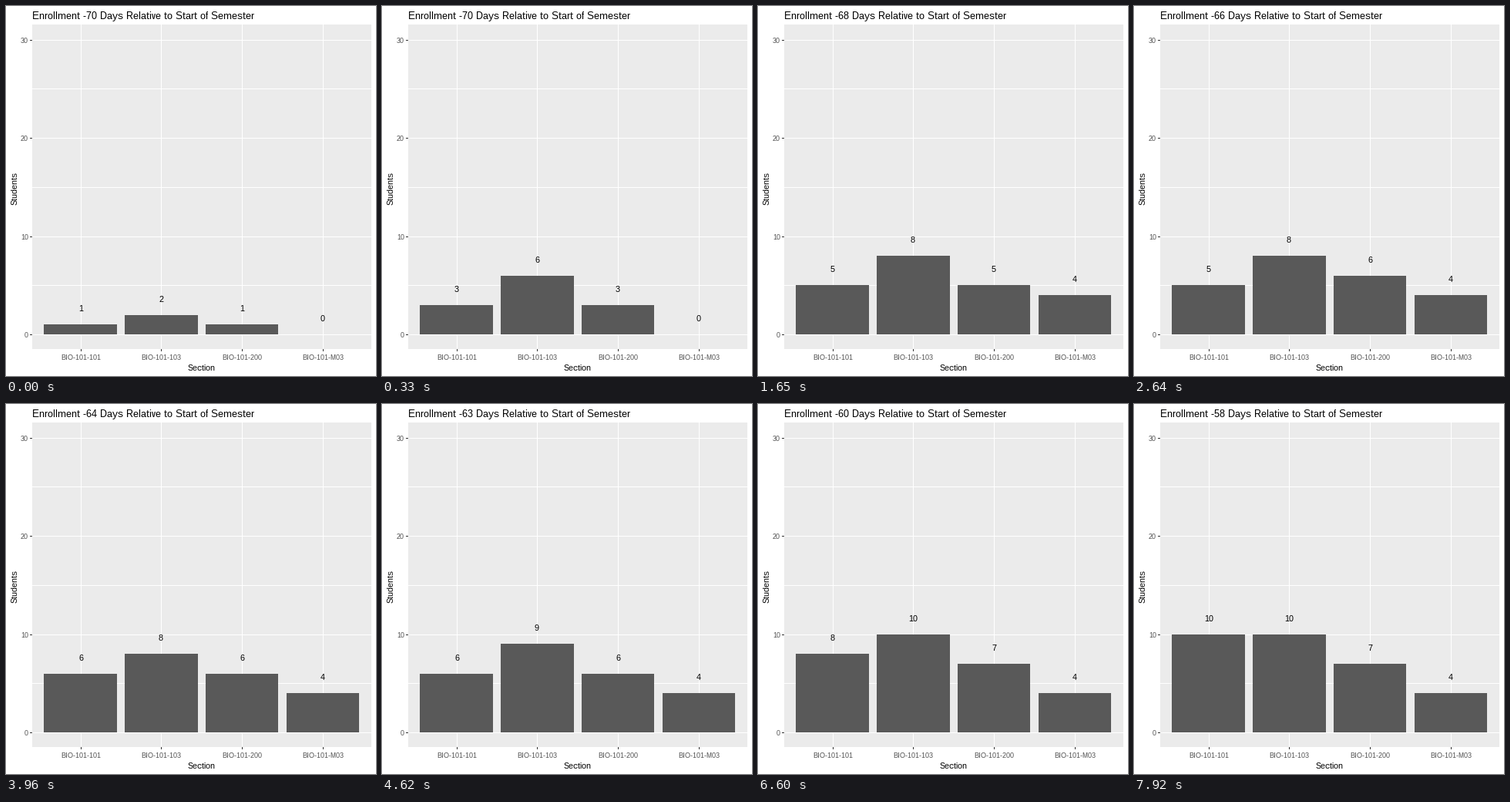
Animation, 480 px wide and 480 px high, one loop 8 s. Source, as a matplotlib script:

```python
import matplotlib.pyplot as plt
from matplotlib.animation import FuncAnimation
from matplotlib.patches import Rectangle

plt.rcParams.update({
    "font.family": "Liberation Sans",
    "text.hinting": "native",
    "text.hinting_factor": 1,
    "toolbar": "None",
})

SIZE = 480
LOOP, TICK, STEP = 8000, 20, 330  # ms
LEFT, RIGHT, TOP, BOTTOM = 34, 474, 24, 445
SECTIONS = ["BIO-101-101", "BIO-101-103", "BIO-101-200", "BIO-101-M03"]

# Enrollment per section, keyed by the step at which it takes effect
COUNTS = {
    0: (1, 2, 1, 0),
    1: (3, 6, 3, 0),
    3: (3, 8, 4, 4),
    5: (5, 8, 5, 4),
    7: (5, 8, 6, 4),
    9: (6, 8, 6, 4),
    13: (6, 9, 6, 4),
    15: (7, 10, 7, 4),
    19: (8, 10, 7, 4),
    21: (10, 10, 7, 4),
}

fig = plt.figure(figsize=(SIZE / 72, SIZE / 72), dpi=72, facecolor="white")
ax = fig.add_axes([0, 0, 1, 1])
ax.set(xlim=(0, SIZE), ylim=(SIZE, 0))
ax.axis("off")


def x_at(i):
    return 96.6 + 104.8 * i


def y_at(value):
    return 426 - 12.745 * value


def box(x0, y0, x1, y1, color, z=1):
    patch = Rectangle((x0, y0), x1 - x0, y1 - y0, fc=color, lw=0,
                      antialiased=False, zorder=z)
    return ax.add_patch(patch)


def label(x, y, text, size=11, color="black", ha="center", **kw):
    return ax.text(x, y, text, size=size, color=color, ha=ha,
                   va="baseline", zorder=4, **kw)


box(LEFT, TOP, RIGHT, BOTTOM, "#EBEBEB", 0)

for value in range(0, 31, 5):
    y = round(y_at(value))
    box(LEFT, y, RIGHT, y + 1, "white")
    if value % 10 == 0:
        box(LEFT - 3, y, LEFT, y + 1, "#333333")
        label(29, y + 4, str(value), 9, "#4D4D4D", "right")

bars, tags = [], []
for i, name in enumerate(SECTIONS):
    x = round(x_at(i))
    box(x, TOP, x + 1, BOTTOM, "white")
    box(x, BOTTOM, x + 1, BOTTOM + 3, "#333333")
    label(x, 459, name, 9, "#4D4D4D")
    x0, x1 = round(x_at(i) - 47.16), round(x_at(i) + 47.16)
    bars.append(box(x0, 426, x1, 426, "#595959", 2))
    tags.append(label(x, 409, ""))

label(254, 473, "Section")
label(15, 236, "Students", rotation=90, rotation_mode="anchor")
title = label(LEFT, 17, "", 13, ha="left")


def update(frame):
    step = int((frame + 0.5) * TICK // STEP)
    title.set_text(f"Enrollment {step // 2 - 70} Days Relative to Start of Semester")
    counts = COUNTS[max(k for k in COUNTS if k <= step)]
    for bar, tag, n in zip(bars, tags, counts):
        top = round(y_at(n))
        bar.set_y(top)
        bar.set_height(426 - top)
        tag.set_y(round(y_at(n) - 16.9))
        tag.set_text(str(n))
    return [title, *bars, *tags]


anim = FuncAnimation(fig, update, frames=LOOP // TICK, interval=TICK,
                     repeat=True, repeat_delay=0)
plt.show()
```
